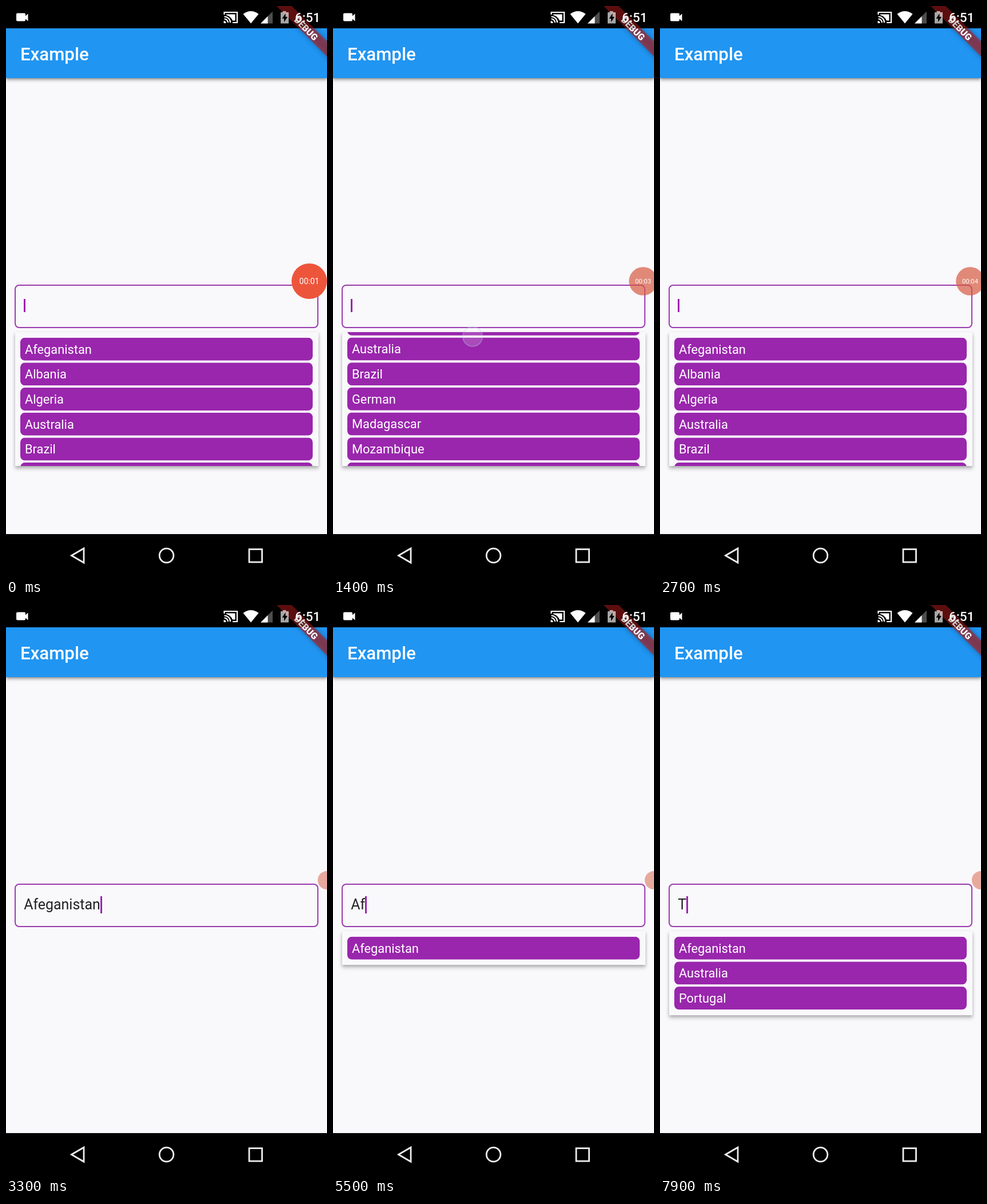
An HTML page for the animation above (8 s loop, 561 px wide and 998 px high).

```html
<!DOCTYPE html>
<html lang="en">
<head>
<meta charset="utf-8">
<style>
html, body { margin: 0; width: 100%; height: 100%; overflow: hidden; }
body { position: relative; background: #f9f8fb; font-family: Roboto, sans-serif; }
div, svg { position: absolute; box-sizing: border-box; }
svg { left: 0; top: 0; }
#bar { top: 39px; width: 561px; height: 87px; padding-left: 25px; background: #2095f2; color: #fff;
  font: 500 31.2px/92px Roboto, sans-serif; box-shadow: 0 3px 6px rgba(0,0,0,.35), 0 1px 3px rgba(0,0,0,.2); }
#field { left: 15px; top: 487px; width: 531px; height: 76px; border: 2px solid #9a3cad; border-radius: 8px; }
#typed { left: 31.2px; top: 503px; font-size: 24.93px; line-height: 41px; color: #212121; white-space: pre; }
#caret { left: 100%; width: 3px; background: #9a26ad; }
#panel { left: 15.5px; top: 570px; width: 530px; overflow: hidden; background: #f9f8fb;
  box-shadow: 0 5px 7px rgba(0,0,0,.2), 0 2px 5px rgba(0,0,0,.17); }
.item { left: 9.5px; width: 511px; height: 40.3px; padding-left: 8px; border-radius: 8px;
  background: #9926ac; color: #fff; font-size: 21.8px; line-height: 41px; will-change: transform; }
#touch { left: -18px; top: -18px; width: 36px; height: 36px; border-radius: 50%;
  background: rgba(255,255,255,.35); border: 2px solid rgba(190,206,236,.7); }
#timer { left: -31px; top: 450px; width: 62px; height: 62px; border-radius: 50%;
  color: #fff; font-size: 14px; line-height: 63px; text-align: center; }
</style>
</head>
<body>
<div id="bar">Example</div>
<div id="field"></div>
<div id="typed"><span id="text"></span><div id="caret"></div></div>
<div id="panel"></div>
<svg width="561" height="998" viewBox="0 0 561 998" fill="#fff" font-family="Roboto, sans-serif">
  <path d="M0 0H561V39H0zM0 923H561V998H0z" fill="#000"/>
  <g transform="translate(561 0) rotate(45)">
    <rect x="-80" y="43.6" width="160" height="18.7" fill="#b71c1c" fill-opacity=".63"
      style="filter:drop-shadow(0 0 4px rgba(0,0,0,.5))"/>
    <text x="2" y="59.4" text-anchor="middle" font-weight="900" font-size="15.9">DEBUG</text>
  </g>
  <path d="M440 0H561V39H440z" fill="#000" fill-opacity=".2"/>
  <path d="M20 12.5h12q2 0 2 2v3l4.5-4v13l-4.500-4v2q0 2-2 2H20q-2 0-2-2v-10q0-2 2-2z"/>
  <path d="M381.5 15V11H404V29H396M381.5 18.5A10.5 10.5 0 0 1 392 29M381.5 22.5A6.5 6.5 0 0 1 388 29"
    fill="none" stroke="#fff" stroke-width="2.2"/>
  <path d="M380.5 26a4 4 0 0 1 4 4h-4zM385 14.5H400.5V25.5H396Q393 18 385 16z"/>
  <path d="M428 30.5L414.5 14Q428 4 441.5 14z"/>
  <path d="M466 9.5V30.5H445z" fill-opacity=".3"/>
  <path d="M457.5 18V30.5H445z"/>
  <path d="M480 11h3.500V9h6v2h4.500V30.5H480z" fill-opacity=".65"/>
  <path d="M488.500 13l-6 9h3.500v6l6-9h-3.500z" fill="#000"/>
  <text x="505" y="28.3" font-weight="500" font-size="22.5">6:51</text>
  <g fill="none" stroke="#eee" stroke-width="2.8">
    <path d="M114.500 960.5L136 948V973z"/>
    <circle cx="280.5" cy="960.5" r="12.3"/>
    <rect x="425" y="949.5" width="22.5" height="22.5"/>
  </g>
</svg>
<div id="touch"></div>
<div id="timer"></div>
<script>
const $ = id => document.getElementById(id);
const countries = ['Afeganistan', 'Albania', 'Algeria', 'Australia', 'Brazil', 'German',
  'Madagascar', 'Mozambique', 'Portugal'];
const LOOP = 8000, STEP = 100, PITCH = 43.67, PAD = 9.5, MAX_SCROLL = 175;

const ramp = (t, from, to) => Math.min(1, Math.max(0, (t - from) / (to - from)));
const easeOut = p => 1 - (1 - p) ** 2;
const within = (t, from, to) => t >= from && t < to;

function typedText(t) {
  if (t < 3100 || within(t, 7200, 7800)) return '';
  if (t >= 7800) return 'T';
  if (t >= 6000) return 'A';
  // Backspacing speeds up while the key is held.
  const kept = t < 4300 ? 11 : Math.round(10 - 8 * ramp(t, 4300, 5500) ** 2);
  return countries[0].slice(0, kept);
}

function drawField(t, text) {
  $('text').textContent = text || '\u200b';
  const caret = $('caret').style;
  caret.top = text ? '6px' : '9px';
  caret.height = text ? '29.5px' : '23px';
  caret.display = within(t, 3900, 4300) || within(t, 6500, 7000) ? 'none' : '';
}

function drawPanel(t, text, offset) {
  const found = countries.filter(c => c.toLowerCase().includes(text.toLowerCase()));
  const panel = $('panel');
  panel.style.display = within(t, 3100, 4300) ? 'none' : '';
  panel.style.height = Math.min(233.7, 2 * PAD + found.length * PITCH - 3.4) + 'px';
  panel.innerHTML = found.map((c, i) =>
    `<div class="item" style="transform:translateY(${PAD + .2 + i * PITCH - offset}px)">${c}</div>`).join('');
}

function drawTouch(t, offset) {
  const swipeUp = ramp(t, 800, 900) - ramp(t, 1300, 1500);
  const swipeDown = ramp(t, 1800, 1900) - ramp(t, 2300, 2600);
  const tap = ramp(t, 2700, 2800) - ramp(t, 2900, 3200);
  const [x, y] = tap ? [250, 600] : t < 1700 ? [244, 709 - offset] : [263, 832 - offset];
  $('touch').style.transform = `translate(${x}px,${y}px)`;
  $('touch').style.opacity = swipeUp + swipeDown + tap;
}

function drawTimer(t) {
  const idle = ramp(t, 0, 300), docked = ramp(t, 2900, 3200);
  const timer = $('timer');
  timer.style.transform =
    `translateX(${530 + 12 * idle + 19 * docked}px) scale(${1 - .2 * idle - .28 * docked})`;
  timer.style.opacity = 1 - .3 * idle - .2 * docked;
  timer.style.background = idle < 1 ? '#ed553b' : '#d85a41';
  timer.textContent = docked === 1 ? '' : '00:0' + (t < 100 ? 1 : 2 + Math.floor(t / 1000));
}

function render(t) {
  const text = typedText(t);
  const offset = MAX_SCROLL * (ramp(t, 800, 1600) - easeOut(ramp(t, 1800, 2300)));
  drawField(t, text);
  drawPanel(t, text, offset);
  drawTouch(t, offset);
  drawTimer(t);
}

let start, shownAt = -1;
function tick(now) {
  start ??= now;
  const t = Math.floor((now - start) % LOOP / STEP) * STEP;
  if (t !== shownAt) render(shownAt = t);
  requestAnimationFrame(tick);
}
render(0);
requestAnimationFrame(tick);
</script>
</body>
</html>
```
